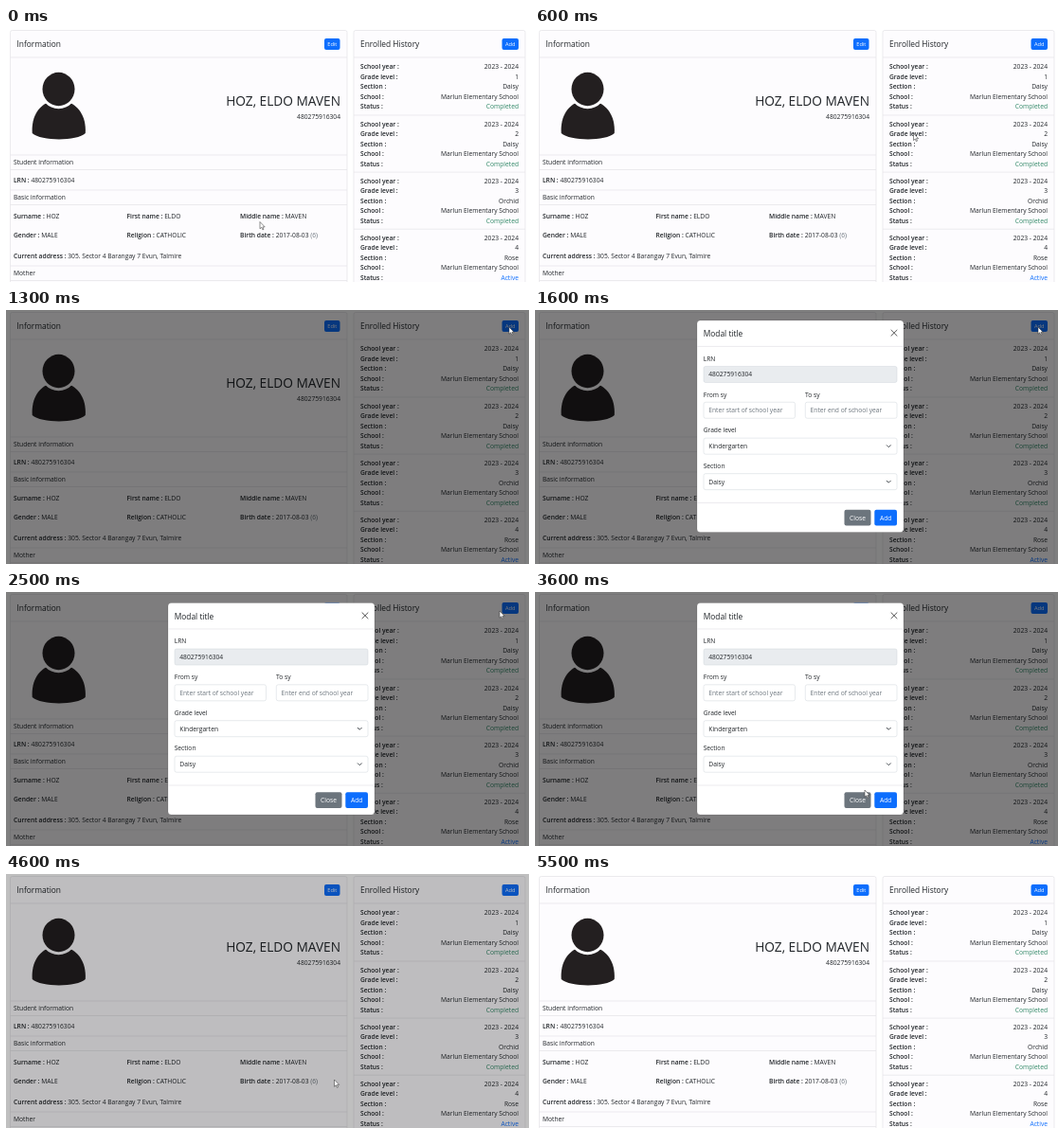
An HTML page for the animation above (5600 ms loop, 552 by 268 pixels).

```html
<!DOCTYPE html>
<html lang="en">
<head>
<meta charset="utf-8">
<title>Student record</title>
<style>
  html, body { margin: 0; width: 100%; height: 100%; overflow: hidden; background: #fff; }
  svg { display: block; width: 100%; height: 100%; }
  text { font: 6.7px "Open Sans", "Noto Sans", sans-serif; fill: #212529; white-space: pre; }
  .b { font-weight: 600; }
  .title { font-size: 8.4px; }
  .name { font-size: 13.7px; }
  .small { font-size: 5.6px; }
  .muted { fill: #6c757d; }
  .white { fill: #fff; }
  .green { fill: #2f8765; }
  .blue { fill: #0d6efd; }
  .line { stroke: #e4e3e7; stroke-width: .7; fill: none; }
  .card { stroke: #e4e3e7; stroke-width: .7; fill: #fdfcfe; }
  .field { fill: #fff; stroke: #ced4da; stroke-width: .5; }
  .locked { fill: #e9ecef; }
</style>
</head>
<body>
<svg id="stage" viewBox="0 0 552 268" preserveAspectRatio="none"></svg>
<script>
const stage = document.getElementById('stage');
const LRN = '480275916304';

const text = (x, y, s, cls = '', anchor = 'start') =>
  `<text x="${x}" y="${y}" class="${cls}" text-anchor="${anchor}">${s}</text>`;
const rect = (x, y, w, h, cls, r = 0, extra = '') =>
  `<rect x="${x}" y="${y}" width="${w}" height="${h}" rx="${r}" class="${cls}" ${extra}/>`;
const rule = (x1, x2, y) => `<path class="line" d="M${x1} ${y}H${x2}"/>`;
const pair = (x, y, label, value) =>
  `<text x="${x}" y="${y}"><tspan class="b">${label} : </tspan>${value}</text>`;
const button = (id, x, y, w, h, label, color, cls = '') =>
  rect(x, y, w, h, '', 2, `id="${id}" fill="${color}"`) +
  text(x + w / 2, y + h / 2 + (cls ? 2 : 2.4), label, 'white ' + cls, 'middle');
const strip = (y, label) =>
  rule(4.5, 360, y) + rule(4.5, 360, y + 15.5) + text(8, y + 10.2, label);
const field = (x, y, w, value, textClass = '', boxClass = '') =>
  rect(x, y, w, 17, 'field ' + boxClass, 2) + text(x + 5.3, y + 11, value, textClass);
const select = (y, value) => field(178, y, 204, value) +
  `<path d="M371 ${y + 7.3}l2.3 2.3l2.3-2.3" fill="none" stroke="#343a40" stroke-width=".9"/>`;

const avatar = `<g fill="#231f20">
  <path d="M27.700 111C26.500 92 36 81 46 78H65C75 81 85 92 83.800 111C75 119.500 37 119.500 27.700 111Z"/>
  <ellipse cx="55.500" cy="64.500" rx="17" ry="17.700" stroke="#fdfcfe" stroke-width="6" paint-order="stroke"/></g>`;

function infoCard() {
  return rect(4.5, 2.5, 355.5, 270, 'card', 2) +
    rule(4.5, 360, 31) + text(11.5, 19.5, 'Information', 'title') +
    button('edit', 336, 11, 16.5, 12, 'Edit', '#0d6efd', 'small') + avatar +
    text(353, 81.5, 'HOZ, ELDO MAVEN', 'name', 'end') + text(353, 95.7, LRN, '', 'end') +
    strip(134, 'Student information') + pair(8, 163, 'LRN', LRN) +
    strip(171, 'Basic information') +
    pair(8, 200.5, 'Surname', 'HOZ') + pair(127.5, 200.5, 'First name', 'ELDO') +
    pair(247, 200.5, 'Middle name', 'MAVEN') +
    pair(8, 221.3, 'Gender', 'MALE') + pair(127.5, 221.3, 'Religion', 'CATHOLIC') +
    pair(247, 221.3, 'Birth date', '2017-08-03 <tspan class="muted">(6)</tspan>') +
    pair(8, 242.5, 'Current address', '305. Sector 4 Barangay 7 Evun, Talmire') +
    strip(251, 'Mother');
}

function historyCard() {
  const entries = ['Daisy', 'Daisy', 'Orchid', 'Rose'].map((section, i) => {
    const done = i < 3;
    const rows = [['School year', '2023 - 2024'], ['Grade level', i + 1], ['Section', section],
      ['School', 'Marlun Elementary School'],
      ['Status', done ? 'Completed' : 'Active', done ? 'green' : 'blue']];
    return rows.map(([label, value, cls], j) => {
      const y = 43.4 + i * 60.1 + j * 10.5;
      return text(374, y, label + ' :', 'b') + text(541, y, value, cls, 'end');
    }).join('') + rule(367, 548, 92 + i * 60.1);
  });
  return rect(367, 2.5, 181, 270, 'card', 2) +
    rule(367, 548, 31) + text(374, 19.5, 'Enrolled History', 'title') +
    button('add', 523.5, 11, 17.5, 12, 'Add', '#0d6efd', 'small') + entries.join('');
}

function modal() {
  return rect(171, 11.5, 218, 223.5, '', 3.5, 'fill="#fff" stroke="#000" stroke-opacity=".2" stroke-width=".6"') +
    text(177.7, 29, 'Modal title', 'title') +
    '<path d="M375.700 21.500l6.600 6.600m0-6.600l-6.600 6.600" stroke="#555" stroke-width="1"/>' +
    rule(171, 389, 39) + rule(171, 389, 204) +
    text(177.7, 54.3, 'LRN') + field(178, 60, 204, LRN, '', 'locked') +
    text(177.7, 92.3, 'From sy') + field(178, 97.8, 96.5, 'Enter start of school year', 'muted') +
    text(285, 92.3, 'To sy') + field(285.3, 97.8, 96.7, 'Enter end of school year', 'muted') +
    text(177.7, 129.8, 'Grade level') + select(135.7, 'Kindergarten') +
    text(177.7, 167.4, 'Section') + select(173.2, 'Daisy') +
    button('close', 326.5, 211.3, 28, 16.8, 'Close', '#6c757d') +
    button('submit', 358.3, 211.3, 23.7, 16.8, 'Add', '#0d6efd');
}

stage.innerHTML = rect(0, 0, 552, 268, 'white') + infoCard() + historyCard() +
  rect(0, 0, 552, 268, '', 0, 'id="backdrop"') +
  `<g id="modal">${modal()}</g>
  <g id="cursor" fill="#fff" stroke="#333" stroke-width=".55" stroke-linejoin="round">
    <path id="arrow" d="M0 0V7.300L1.700 5.800L2.900 8.400L4 7.900L2.900 5.400H5.200Z"/>
    <path id="hand" d="M0 .8Q.8-.4 1.600.8V3.800L5 4.500Q5.900 4.800 5.700 5.800L5 10H.6L-2 6.300Q-1.700 5.200-.8 5.700L0 6.400Z"/>
  </g>`;

const part = id => document.getElementById(id);
const ramp = (t, start, length) => Math.min(1, Math.max(0, (t - start) / length));
const smooth = u => u * u * (3 - 2 * u);

// time, x, y of the pointer tip
const path = [[0, 268, 204.5], [100, 268, 204.5], [1100, 531, 18], [1900, 531, 18],
  [2400, 521, 20], [2500, 521, 20], [3000, 381, 25], [3600, 348, 209], [3900, 346.5, 217],
  [4800, 346.5, 217], [5400, 346.5, 272], [5600, 346.5, 272]];

function pointer(t) {
  const i = path.findIndex(p => p[0] > t);
  const [a, b] = [path[i - 1], path[i]];
  const u = smooth(ramp(t, a[0], b[0] - a[0]));
  return [a[1] + (b[1] - a[1]) * u, a[2] + (b[2] - a[2]) * u];
}

function draw(now) {
  const t = Math.floor(now % 5600 / 100) * 100;
  const onAdd = t >= 1100 && t < 1300;
  const onClose = t >= 3700 && t < 4400;
  const slide = (1 - ramp(t, 1350, 300)) ** 2 + ramp(t, 4200, 300);

  part('backdrop').setAttribute('opacity', .5 * (ramp(t, 1200, 100) - ramp(t, 4550, 100)));
  part('modal').setAttribute('opacity', ramp(t, 1350, 150) - ramp(t, 4200, 150));
  part('modal').setAttribute('transform', `translate(0 ${-20 * slide})`);
  part('add').setAttribute('fill', onAdd ? '#0b5ed7' : '#0d6efd');
  part('close').setAttribute('fill', onClose ? '#5c636a' : '#6c757d');
  part('cursor').setAttribute('transform', `translate(${pointer(t)})`);
  part('hand').setAttribute('display', onAdd || onClose ? 'inline' : 'none');
  part('arrow').setAttribute('display', onAdd || onClose ? 'none' : 'inline');
  requestAnimationFrame(() => draw(performance.now()));
}
draw(performance.now());
</script>
</body>
</html>
```
